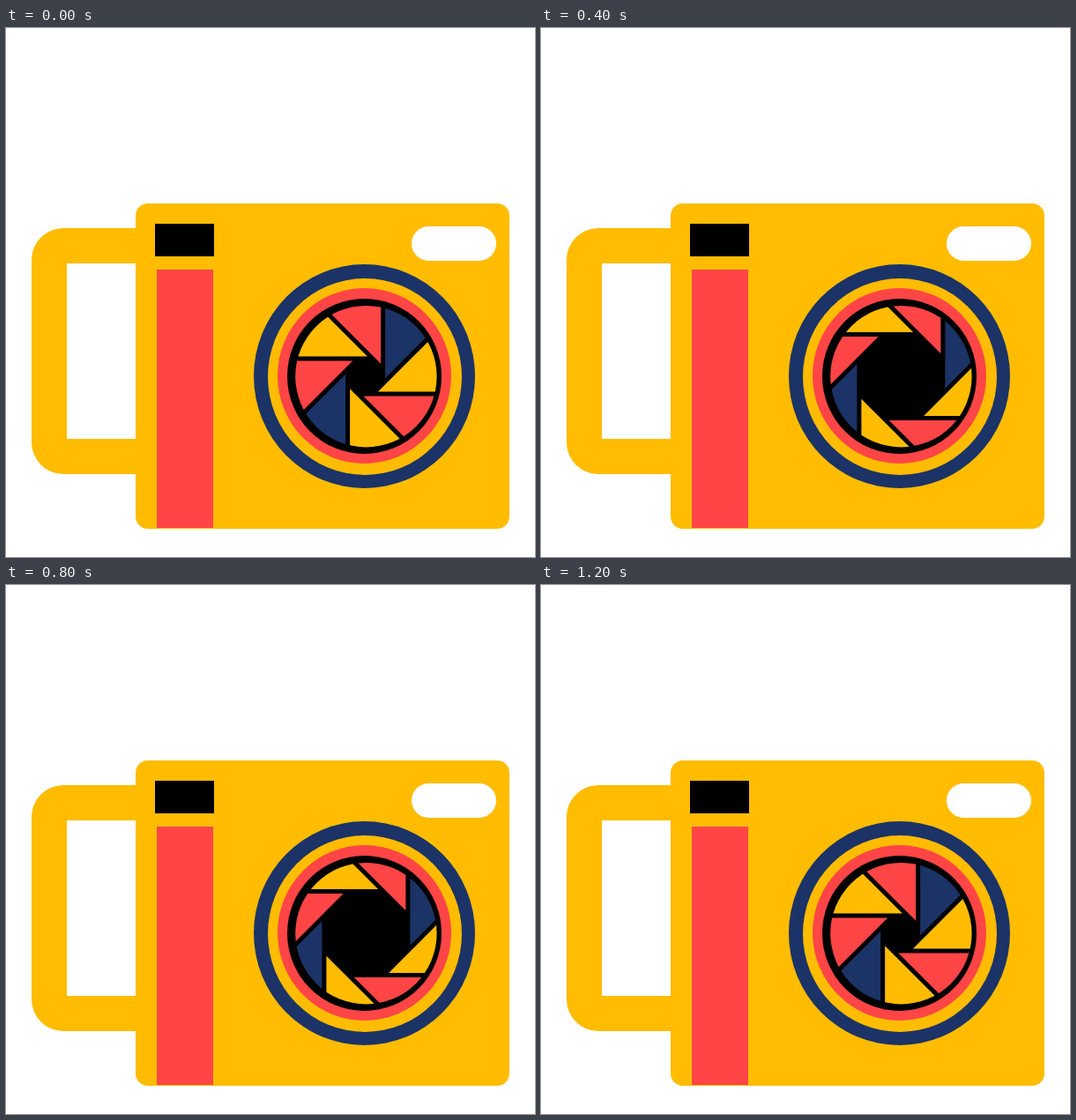
An HTML page for the animation above (1400 ms loop, 600 by 600 pixels).

```html
<!DOCTYPE html>
<html lang="en">
<head>
<meta charset="utf-8">
<title>Camera shutter</title>
<style>
  html, body { margin: 0; width: 100%; height: 100%; overflow: hidden; background: #fff; }
  svg { display: block; width: 100vw; height: 100vh; }
  .yellow { fill: #ffbc00; }
  .red { fill: #ff4546; }
  .navy { fill: #1b3366; }
</style>
</head>
<body>
<svg viewBox="0 0 600 600">
  <clipPath id="barrel"><circle cx="408.4" cy="395.2" r="80.2"/></clipPath>

  <!-- handle and body -->
  <rect class="yellow" x="29" y="227" width="160" height="279" rx="36"/>
  <rect x="69" y="267" width="90" height="199" fill="#fff"/>
  <rect class="yellow" x="147" y="199" width="424" height="369" rx="14"/>
  <rect x="169" y="222" width="67" height="37"/>
  <rect class="red" x="171" y="274" width="64" height="293"/>
  <rect x="460" y="225" width="96" height="39" rx="19.5" fill="#fff"/>

  <!-- lens -->
  <ellipse class="navy" cx="406.5" cy="395" rx="125.5" ry="127"/>
  <ellipse class="yellow" cx="407" cy="395.5" rx="110" ry="111.5"/>
  <ellipse class="red" cx="406.5" cy="394.5" rx="98.5" ry="99.5"/>
  <ellipse cx="406.5" cy="395" rx="87.5" ry="88"/>
  <g clip-path="url(#barrel)"><g id="iris"></g></g>
</svg>
<script>
  const STEP = 200, GAP = 2.5, REACH = 200;
  const colors = ['yellow', 'red', 'navy', 'yellow', 'red', 'yellow', 'navy', 'red'];
  // Each pose: distance from centre to blade edge, centre x
  const poses = [[20, 407.6], [35.4, 408.4], [47.5, 408.4], [64.8, 408.5]];
  const iris = document.getElementById('iris');

  const blades = colors.map((color, i) => {
    const blade = document.createElementNS('http://www.w3.org/2000/svg', 'path');
    blade.setAttribute('class', color);
    blade.setAttribute('transform', `rotate(${i * 45})`);
    return iris.appendChild(blade);
  });

  // A blade is a 45 degree wedge between two neighbouring octagon sides
  function setIris([opening, x]) {
    const tipY = -(opening + GAP);
    const tipX = Math.SQRT2 * (opening - GAP) + tipY;
    iris.setAttribute('transform', `translate(${x} 395)`);
    for (const blade of blades) {
      blade.setAttribute('d', `M${tipX} ${tipY}h${-REACH}v${-REACH}z`);
    }
  }

  function draw(now) {
    const step = Math.floor(now / STEP) % 7;
    setIris(poses[3 - Math.abs(step - 3)]);
    requestAnimationFrame(draw);
  }
  draw(0);
</script>
</body>
</html>
```
